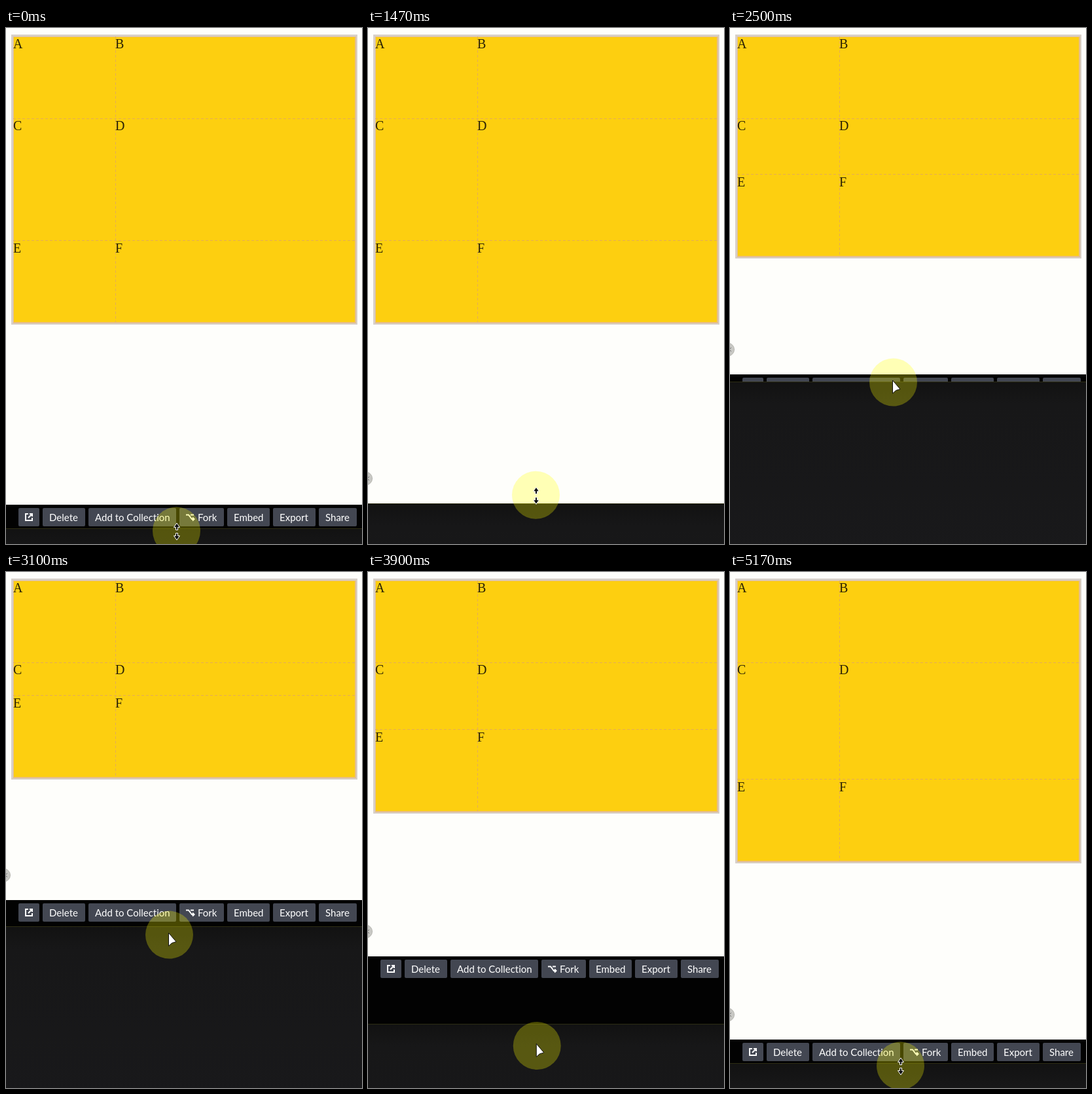
An HTML page that plays this animation: 544x788 px, repeating every 5.21 s.

```html
<!DOCTYPE html>
<html lang="en">
<head>
<meta charset="utf-8">
<title>Resizable grid</title>
<style>
html, body { margin: 0; width: 100%; height: 100%; overflow: hidden; background: #fefefb; }
svg { display: block; width: 544px; height: 788px; }
.cell { font: 20px "Liberation Serif", "Times New Roman", serif; fill: #2a2204; }
.label { font: 15px Lato, sans-serif; font-variant-ligatures: none; fill: #fff; }
.dash { stroke: #e5ac55; stroke-dasharray: 4 3; fill: none; }
.icon { stroke: #fff; stroke-width: 2; fill: none; }
</style>
</head>
<body>
<svg viewBox="0 0 544 788">
  <defs>
    <linearGradient id="shade" x2="0" y2="1">
      <stop offset="0" stop-color="#121212"/>
      <stop offset=".12" stop-color="#171718"/>
      <stop offset="1" stop-color="#19191b"/>
    </linearGradient>
  </defs>
  <g id="grid">
    <rect id="edge" x="8" y="10" width="529" fill="#d8d0c8"/>
    <rect id="rim" x="11" y="13" width="524" fill="#e6bd88"/>
    <rect id="fill" x="12" y="14" width="521" fill="#fdcf10"/>
    <path id="lines" class="dash"/>
    <text class="cell" x="11" y="31">A</text>
    <text class="cell" x="167" y="31">B</text>
    <text class="cell" x="11" y="156">C</text>
    <text class="cell" x="167" y="156">D</text>
    <g id="lastRow">
      <text class="cell" x="11" y="18">E</text>
      <text class="cell" x="167" y="18">F</text>
    </g>
  </g>
  <g id="handle">
    <circle cx="-3.5" r="10" fill="#c8c8c4" stroke="#b6b6b0"/>
    <path d="M2 -3L-1 0L2 3" fill="none" stroke="#777"/>
  </g>
  <g id="bar">
    <rect width="544" height="788" fill="#020202"/>
    <g id="buttons"></g>
    <path class="icon" d="M34 14H30V24H40V20M34 20L39.5 14.5M36 14H40V18"/>
    <path class="icon" stroke-width="1.6" d="M275 15.5H279L284 22H287M282 15.5H287M285 19.5L287.5 22L285 24.5"/>
  </g>
  <g id="panel">
    <rect width="544" height="290" fill="url(#shade)"/>
    <rect width="544" height="1" fill="#2e2d14"/>
  </g>
  <g id="pointer">
    <circle r="36.5" fill="#ff0" fill-opacity=".28"/>
    <path id="arrow" d="M-1 -3V17L4 12.5L10.5 10.5Z" fill="#fff" stroke="#111"/>
    <path id="resize" transform="translate(.5 1)" fill="#111" stroke="#fff"
      d="M0 -13L4.5 -6.5H1.5V-2.5H-1.5V-6.5H-4.5ZM0 13L4.5 6.5H1.5V2.5H-1.5V6.5H-4.5Z"/>
  </g>
</svg>
<script>
const LOOP = 5210;
const $ = id => document.getElementById(id);
const clamp = p => Math.min(1, Math.max(0, p));
const linear = p => p;
const sineOut = p => Math.sin(p * Math.PI / 2);

// The pointer is dragged up and down again; each other layer follows with its own delay.
// y: rest, highest and final position; up and down: start and end times.
const layers = {
  pointer: { y: [768, 541, 754], up: [1150, 2480], down: [3050, 4350], ease: sineOut },
  panel: { y: [764, 537, 750], up: [1260, 2520], down: [3082, 4682], ease: sineOut },
  bar: { y: [728, 501, 714], up: [1460, 2645], down: [3224, 4907], ease: linear },
  page: { y: [728, 502, 715], up: [1830, 2730], down: [3224, 4907], ease: linear }
};

const progress = (t, [from, to]) => clamp((t - from) / (to - from));

function height({ y: [rest, top, end], up, down, ease }, t) {
  return t < down[0]
    ? rest + (top - rest) * progress(t, up)
    : top + (end - top) * ease(progress(t, down));
}

const buttons = [["", 32], ["Delete", 65], ["Add to Collection", 134], ["Fork", 68],
                 ["Embed", 65], ["Export", 65], ["Share", 58]];
let left = 19;
for (const [name, width] of buttons) {
  const indent = name === "Fork" ? 28 : 10;
  $("buttons").innerHTML +=
    `<rect x="${left}" y="5" width="${width}" height="28" rx="2" fill="#434752"/>` +
    `<text class="label" x="${left + indent}" y="25">${name}</text>`;
  left += width + 5;
}

const move = (id, x, y) => $(id).setAttribute("transform", `translate(${x} ${y})`);
const show = (id, on) => $(id).setAttribute("visibility", on ? "visible" : "hidden");

// The grid takes 60% of the page height; only its middle row stretches.
function drawGrid(page) {
  const bottom = Math.round(page * 0.6 + 16);
  const row = bottom - 128;
  $("edge").setAttribute("height", bottom - 10);
  $("rim").setAttribute("height", bottom - 15);
  $("fill").setAttribute("height", bottom - 18);
  $("lines").setAttribute("d",
    `M11 138.5H533M11 ${row - 0.5}H533M167.5 13V${bottom - 4}`);
  move("lastRow", 0, row);
}

function draw(t) {
  const y = {};
  for (const name in layers) y[name] = height(layers[name], t);
  const bar = Math.round(y.bar);
  const lift = clamp((layers.pointer.y[t < 3050 ? 0 : 2] - y.pointer) / 150);
  drawGrid(y.page);
  move("bar", 0, bar);
  move("handle", 0, bar - 38);
  move("panel", 0, Math.round(y.panel));
  move("pointer", 260.5 - 11 * lift, y.pointer);

  const dragging = t < 1650 || t >= 4750;
  show("resize", dragging);
  show("arrow", !dragging);
  show("handle", t >= 1400 && (t < 1700 || t >= 2500));
}

const start = performance.now();
function tick() {
  draw((performance.now() - start) % LOOP);
  requestAnimationFrame(tick);
}
draw(0);
requestAnimationFrame(tick);
</script>
</body>
</html>
```
